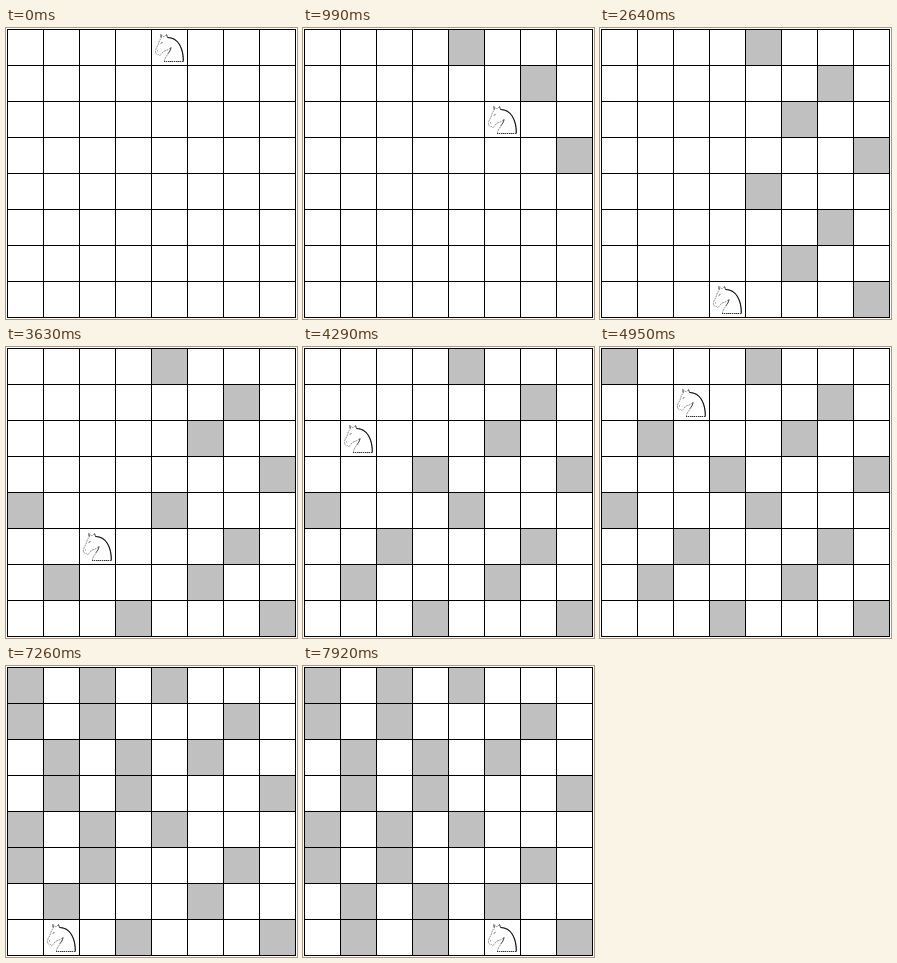
Write an HTML page that moves like this. It is 291 px wide and 291 px high and loops after 8 s.

```html
<!DOCTYPE html>
<html lang="en">
<head>
<meta charset="utf-8">
<title>Knight's tour</title>
<style>
  html, body { margin: 0; width: 100%; height: 100%; overflow: hidden; background: #fff; }
  svg { display: block; width: 100vw; height: 100vh; }
  #visited { fill: #c0c0c0; }
  #grid { fill: none; stroke: #000; shape-rendering: crispEdges; }
  #knight { fill: none; stroke-linejoin: round; }
  .body { fill: #fff; stroke: #777; stroke-width: .8; stroke-dasharray: 2 .7; }
  .edge { stroke: #111; stroke-width: 1.1; }
  .base { stroke: #333; stroke-dasharray: 1 1; }
  .detail { stroke: #444; stroke-width: .9; }
</style>
</head>
<body>
<svg viewBox="0 0 291 291">
  <g id="visited" shape-rendering="crispEdges"></g>
  <path id="grid"/>
  <g id="knight">
    <path class="body" d="M12.5 31.5C12 27 18.5 23 19 17.5C16 20.5 13.5 20 11.5 21.5C10 22.7 9.5 25 7.5 25.5L6.5 24.5L5.5 24.8C3.5 23.8 3 21.5 3.7 19.5C4.8 17 6.2 15.5 6.8 12.5C7 10.5 8.2 9.5 9.2 8.3L8.8 4.5L12 7L14.5 4.5L15.5 7.5C26 7.5 31.5 18 31.3 31.5Z"/>
    <path class="edge" d="M15.5 7.5C26 7.5 31.5 18 31.3 31.5"/>
    <path class="base" d="M12 31.5H32"/>
    <path class="detail" d="M19 17.3C18.8 20 17.5 21.8 15.8 23.5M8.8 4.5L9.3 7.5M14.5 4.5L15.5 7.5M8.7 13.5L10.5 12.4M5 21.3L5.8 20.6"/>
  </g>
</svg>
<script>
  const SIZE = 36, STEP = 330, LOOP = 8000;
  // Each square is written as column then row.
  const tour = ("40 61 73 52 44 65 77 56 37 16 04 25 33 12 00 " +
    "21 13 01 20 32 24 05 17 36 57").split(" ")
    .map(square => [...square].map(n => n * SIZE + 2));

  const byId = id => document.getElementById(id);

  let lines = "";
  for (let i = 0; i <= 8; i++) {
    const p = i * SIZE + 1.5;
    lines += `M${p} 1V290M1 ${p}H290`;
  }
  byId("grid").setAttribute("d", lines);

  byId("visited").innerHTML = tour
    .map(([x, y]) => `<rect x="${x}" y="${y}" width="35" height="35"/>`)
    .join("");
  const squares = [...byId("visited").children];

  let shown = -1;
  function draw() {
    const move = Math.floor(performance.now() % LOOP / STEP);
    if (move !== shown) {
      shown = move;
      squares.forEach((square, i) => square.style.display = i < move ? "" : "none");
      byId("knight").setAttribute("transform", `translate(${tour[move]})`);
    }
    requestAnimationFrame(draw);
  }
  draw();
</script>
</body>
</html>
```
